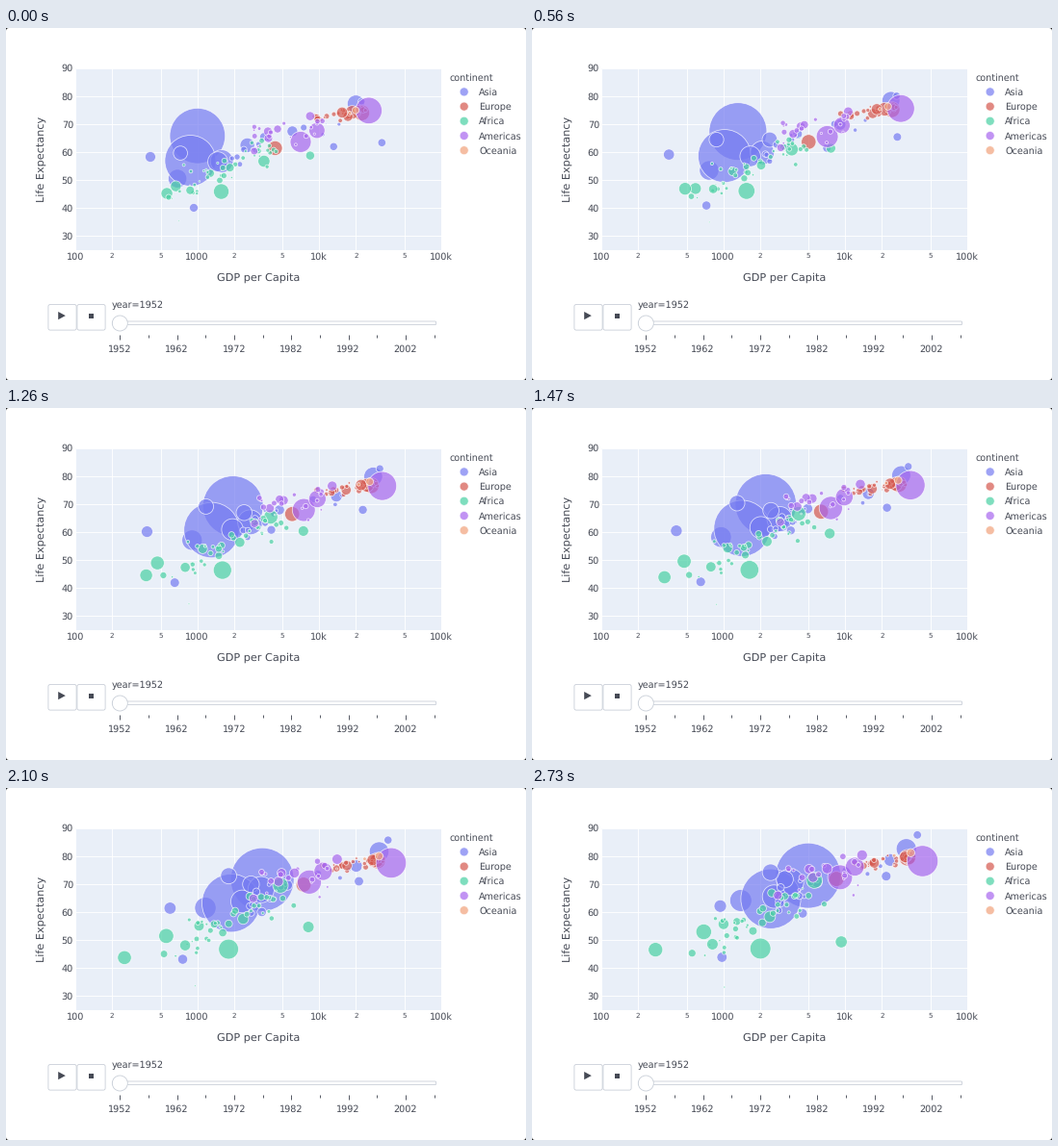
These frames come from a looping animation (540 px wide and 366 px high, 3.15 s). A matplotlib script:

```python
import numpy as np
import matplotlib as mpl
import matplotlib.pyplot as plt
from matplotlib.animation import FuncAnimation
from matplotlib.patches import Circle, FancyBboxPatch, Polygon, Rectangle

W, H, DPI = 540, 366, 100
PT = 72 / DPI
FRAMES, INTERVAL = 45, 70
START, STEP, YEARS = 0.165, 0.13, 6

LEFT, RIGHT, TOP, BOTTOM = 72, 452, 41.7, 230.6
MAX_RADIUS, MAX_POP = 33.9, 1319
INK, BORDER, PANEL = "#464a55", "#c6ccd6", "#e9eff8"

# Landmark bubbles: final population in millions, then a few points that
# the GDP and the life expectancy pass through at even time steps.
ASIA = {
    "Afghanistan": (32, (978, 642, 975), (39.9, 43.8)),
    "Bangladesh": (150, (677, 903, 1391), (50, 64.1)),
    "China": (1319, (962, 1950, 4959), (65.5, 73)),
    "India": (1110, (856, 1303, 2452), (56.6, 64.7)),
    "Indonesia": (224, (1517, 2726, 3541), (56.2, 70.7)),
    "Iraq": (27, (14517, 5500, 3300, 4471), (62, 59.5)),
    "Japan": (127, (19384, 27800, 31656), (77.1, 82.6)),
    "Korea": (49, (5623, 13900, 23348), (67, 78.6)),
    "Myanmar": (48, (424, 379, 944), (58.1, 62.1)),
    "Pakistan": (169, (1443, 2606), (56.2, 65.5)),
    "Philippines": (91, (2603, 2400, 3190), (62.1, 71.7)),
    "Saudi Arabia": (28, (33693, 22600, 21655), (63, 72.8)),
    "Vietnam": (85, (707, 1170, 2442), (58.8, 69.2, 74.2)),
}
EUROPE = {
    "Germany": (82, (22032, 32170), (73.8, 79.4)),
    "Turkey": (71, (4241, 8458), (61, 71.8)),
    "United Kingdom": (60, (18232, 33203), (74, 79.4)),
}
AFRICA = {
    "Congo": (65, (674, 519, 286, 278), (47.8, 46.1, 43.3, 46.5)),
    "Egypt": (80, (3503, 3980, 5581), (56, 65.4, 71.3)),
    "Ethiopia": (76, (578, 465, 691), (44.9, 52.9)),
    "Nigeria": (135, (1577, 1600, 2014), (45.8, 46.9)),
    "South Africa": (44, (8568, 7350, 9270), (58.2, 61.7, 58, 49.3)),
}
AMERICAS = {
    "Brazil": (190, (7031, 7440, 9066), (63.3, 72.4)),
    "Mexico": (109, (9611, 9600, 11978), (67.4, 76.2)),
    "United States": (301, (25010, 42952), (74.7, 78.2)),
}
OCEANIA = {
    "Australia": (20, (19477, 34435), (74.7, 81.2)),
    "New Zealand": (4, (17632, 25185), (73.8, 80.2)),
}

# label, colour, population growth, landmarks, and the crowd of small bubbles:
# count, log GDP range, its drift, life at 10k, life per decade, scatter, rise
CONTINENTS = [
    ("Asia", "#757bf1", 1.4, ASIA, (17, (3.25, 4.4), 0.17, 69, 14, 2.5, 7)),
    ("Europe", "#d5574d", 1.07, EUROPE, (26, (3.95, 4.42), 0.18, 72, 7, 1, 5)),
    ("Africa", "#48d0a3", 1.85, AFRICA, (43, (2.75, 3.65), 0.04, 67, 17, 4, 3)),
    ("Americas", "#a766ee", 1.4, AMERICAS, (21, (3.45, 4.05), 0.11, 69.5, 12, 3, 7)),
    ("Oceania", "#f2a27b", 1.35, OCEANIA, (0, (4, 4), 0, 0, 0, 0, 0)),
]

rng = np.random.default_rng(12)


def to_x(gdp):
    return LEFT + (RIGHT - LEFT) * (np.log10(gdp) - 2) / 3


def to_y(life):
    return BOTTOM - (BOTTOM - TOP) * (np.asarray(life) - 25) / 65


def curve(points):
    """Smooth curve through the points, sampled at every data year."""
    n = len(points)
    fit = np.polyfit(np.linspace(0, 1, n), points, n - 1)
    return np.polyval(fit, np.linspace(0, 1, YEARS))


def track(pop, gdp, life, growth):
    """Pixel x, y and radius at every data year."""
    pops = np.linspace(pop / growth, pop, YEARS)
    return curve(to_x(gdp)), curve(to_y(life)), MAX_RADIUS * np.sqrt(pops / MAX_POP)


def crowd(count, span, drift, level, slope, scatter, rise):
    """Small bubbles around a line of life expectancy over log GDP."""
    for _ in range(count):
        wealth = rng.uniform(*span)
        age = level + slope * (wealth - 4) + rng.normal(0, scatter)
        gain = drift + rng.normal(0, 0.08)
        bend = gain / 2 + rng.normal(0, 0.03)
        pop = min(rng.lognormal(np.log(7), 1), 40)
        yield (pop, 10 ** np.array([wealth, wealth + bend, wealth + gain]),
               (age, age + rise + rng.normal(0, scatter / 2)))


def build_tracks():
    tracks, colors = [], []
    for _, color, growth, landmarks, rule in CONTINENTS:
        for row in [*landmarks.values(), *crowd(*rule)]:
            tracks.append(track(*row, growth))
            colors.append(mpl.colors.to_rgba(color, 0.7))
    return np.array(tracks), colors


mpl.rcParams.update({"font.family": "DejaVu Sans", "text.hinting": "none"})
fig = plt.figure(figsize=(W / DPI, H / DPI), dpi=DPI, facecolor="#222222")
ax = fig.add_axes([0, 0, 1, 1])
ax.set(xlim=(0, W), ylim=(H, 0))
ax.axis("off")


def label(x, y, text, size=9.7, ha="center", **kw):
    ax.text(x, y, text, fontsize=size * PT, ha=ha, va="baseline", color=INK, **kw)


def line(xs, ys, color, width=0.9, **kw):
    ax.plot(xs, ys, color=color, lw=width * PT, solid_capstyle="butt", **kw)


def shape(patch, face="white", edge=BORDER, width=0.8, **kw):
    patch.set(facecolor=face, edgecolor=edge, linewidth=width * PT, **kw)
    return ax.add_patch(patch)


def rounded(x, y, w, h, radius, **kw):
    box = f"round,pad=0,rounding_size={radius}"
    shape(FancyBboxPatch((x, y), w, h, boxstyle=box), **kw)


def draw_axes():
    panel = shape(Rectangle((LEFT, TOP), RIGHT - LEFT, BOTTOM - TOP), PANEL, "none", zorder=0)
    for power, name in zip(range(2, 6), ("100", "1000", "10k", "100k")):
        for digit in (1, 2, 5):
            x = to_x(digit * 10.0 ** power)
            if x > RIGHT + 1:
                continue
            line([x, x], [TOP, BOTTOM], "white", zorder=1)
            if digit == 1:
                label(x, 241.3, name)
            else:
                label(x, 239.2, str(digit), 7.2)
    for life in range(30, 91, 10):
        y = to_y(life)
        line([LEFT, RIGHT], [y, y], "white", zorder=1)
        label(70, y + 3.6, str(life), ha="right")
    label(262, 262.8, "GDP per Capita", 11.2)
    label(39.6, 136.5, "Life Expectancy", 11.2, rotation=90, rotation_mode="anchor")
    return panel


def draw_legend():
    label(460.6, 54.4, "continent", ha="left")
    for i, (name, color, *_) in enumerate(CONTINENTS):
        y = 66.4 + 15.2 * i
        shape(Circle((475.7, y), 4.5), color, "white", alpha=0.7)
        label(491.2, y + 3.5, name, ha="left")


def draw_controls():
    for x in (43.9, 73.9):
        rounded(x, 287.5, 29.2, 26.6, 2)
    shape(Polygon([(54.2, 295), (61.8, 299.1), (54.2, 303.2)]), INK, "none")
    shape(Rectangle((85.7, 296.8), 5, 5), INK, "none")

    label(110, 291.3, "year=1952", ha="left")
    rounded(110.6, 305, 336, 3.6, 1)
    shape(Circle((118.3, 307), 8), zorder=3)
    for i in range(12):
        x = 118.3 + 29.66 * i
        major = i % 2 == 0
        line([x, x], [319, 324 if major else 322], INK)
        if major:
            label(x, 337, str(1952 + 5 * i))


rounded(0, 0, W, H, 3, edge="none", zorder=-1)
panel = draw_axes()
draw_legend()
draw_controls()

tracks, colors = build_tracks()
bubbles = ax.scatter(tracks[:, 0, 0], tracks[:, 1, 0], c=colors,
                     edgecolors=(1, 1, 1, 0.75), linewidths=0.8 * PT, zorder=2)
bubbles.set_clip_path(panel)


def update(frame):
    progress = min(START + STEP * frame, YEARS - 1)
    year = min(int(progress), YEARS - 2)
    part = progress - year
    x, y, r = ((1 - part) * tracks[:, :, year] + part * tracks[:, :, year + 1]).T
    bubbles.set_offsets(np.column_stack([x, y]))
    bubbles.set_sizes((2 * r * PT) ** 2)
    return (bubbles,)


anim = FuncAnimation(fig, update, frames=FRAMES, interval=INTERVAL, repeat=True)
plt.show()
```
